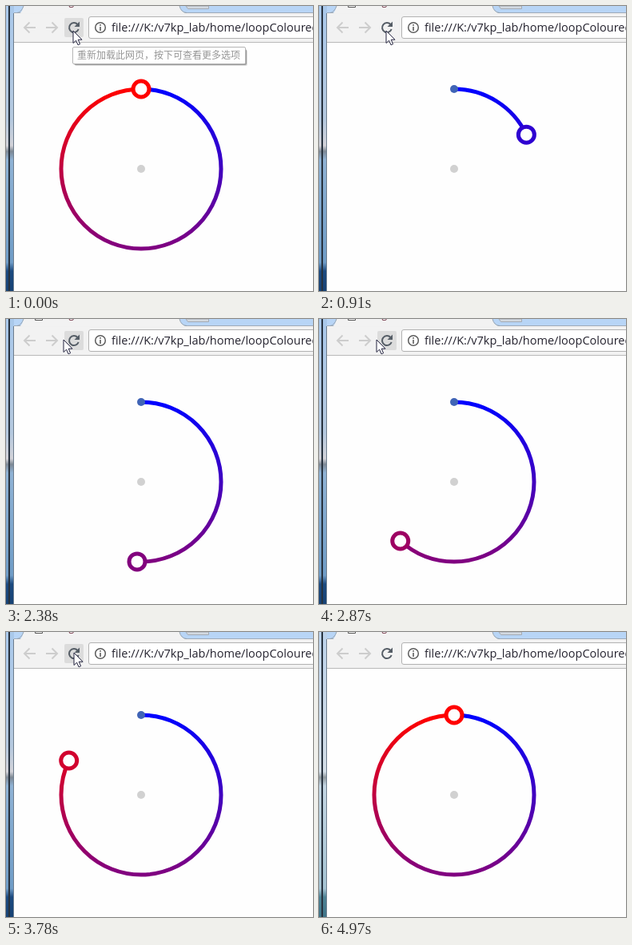
These frames come from a looping animation (384x357 px, 5.04 s). An HTML page:

```html
<!DOCTYPE html>
<html lang="en">
<head>
<meta charset="utf-8">
<title>Gradient ring</title>
<style>
  html, body { margin: 0; width: 100%; height: 100%; overflow: hidden; background: #fefefe; }
  svg { display: block; width: 384px; height: 357px; }
  .url { font: 14.5px "Open Sans", "Noto Sans", sans-serif; fill: #24222e; }
  .tip { font: 12px "Noto Sans CJK SC", "Noto Sans CJK", sans-serif; fill: #969696; }
  .tab { font: 12px "Open Sans", sans-serif; fill: #6b2a3c; }
  .line { fill: none; stroke-width: 2; }
  .arc { fill: none; stroke-width: 5; }
</style>
</head>
<body>
<svg viewBox="0 0 384 357">
  <defs>
    <linearGradient id="right" gradientUnits="userSpaceOnUse" x1="0" y1="104" x2="0" y2="304">
      <stop stop-color="#00f"/><stop offset="1" stop-color="#800080"/>
    </linearGradient>
    <linearGradient id="left" gradientUnits="userSpaceOnUse" x1="0" y1="104" x2="0" y2="304">
      <stop stop-color="#f00"/><stop offset="1" stop-color="#800080"/>
    </linearGradient>
    <linearGradient id="desk" x2="0" y2="1">
      <stop stop-color="#a9c8ea"/><stop offset=".4" stop-color="#b4c8de"/>
      <stop offset=".49" stop-color="#d2d2d8"/><stop offset=".51" stop-color="#7d8894"/>
      <stop offset=".54" stop-color="#8fb2d4"/><stop offset=".9" stop-color="#6f9cc6"/>
      <stop offset=".93" stop-color="#1c4a80"/><stop offset="1" stop-color="#174274"/>
    </linearGradient>
    <linearGradient id="deskLate" x2="0" y2="1">
      <stop stop-color="#bcd2ea"/><stop offset=".49" stop-color="#d3dde6"/>
      <stop offset=".51" stop-color="#8e979c"/><stop offset=".54" stop-color="#c3d5e2"/>
      <stop offset=".9" stop-color="#a5c3d2"/><stop offset=".93" stop-color="#4d8294"/>
      <stop offset="1" stop-color="#3f7488"/>
    </linearGradient>
  </defs>

  <!-- window edge -->
  <rect id="edge" width="10" height="357"/>
  <rect x="3" width="2" height="357" fill="#27323e"/>
  <rect x="9" y="9" width="1" height="348" fill="#6d7d8d"/>

  <!-- tab strip and toolbar -->
  <rect x="10" width="374" height="9" fill="#b8d5f6"/>
  <rect x="10" y="9" width="374" height="36" fill="#f2f2f2"/>
  <path d="M10 8.5H384" stroke="#9fabb8"/>
  <path d="M10 9.5H17Q20 8 22 0H217Q219 8 226 9.5Z" fill="#f2f2f2"/>
  <path d="M14 8.5Q19 8 22 0M217 0Q219 8 226 8.5" fill="none" stroke="#96a3b0"/>
  <path d="M225 0L227.5 3.5H253.500V0Z" fill="#d3d9e0" stroke="#a3aab3"/>
  <path id="page" d="M36.500 -4V1.500H45.500V-4" fill="#fff" stroke="#555"/>
  <text class="tab" x="51" y="-1">arcing</text>
  <path d="M10 45.500H384" stroke="#b9b9b9"/>

  <g class="line" stroke="#cdcdcd">
    <path d="M37 27H23.500M29.500 20.500L23 27L29.500 33.500"/>
    <path d="M50 27H63.500M57.500 20.500L64 27L57.500 33.500"/>
  </g>
  <rect id="hover" x="73" y="15" width="24" height="24" rx="2" fill="#dcdcdc"/>
  <path class="line" d="M89.500 23A6 6 0 1 0 90.700 29" stroke="#555d66"/>
  <path d="M92 19.500V26H85.500Z" fill="#555d66"/>

  <rect x="103.500" y="13.500" width="300" height="27" rx="2.500" fill="#fff" stroke="#b2b2b2"/>
  <circle cx="118" cy="27" r="6.300" fill="none" stroke="#5c5c5c" stroke-width="1.500"/>
  <path d="M118 23V24.700M118 26V31" stroke="#5c5c5c" stroke-width="1.600"/>
  <text class="url" x="132" y="32">file:///K:/v7kp_lab/home/loopColoured</text>

  <!-- ring -->
  <circle cx="169" cy="204" r="5" fill="#d1d1d1"/>
  <path id="arcR" class="arc" d="M169 104A100 100 0 0 1 169 304" pathLength="180" stroke="url(#right)"/>
  <path id="arcL" class="arc" d="M169 304A100 100 0 0 1 169 104" pathLength="180" stroke="url(#left)"/>
  <circle cx="169" cy="104" r="5" fill="#4064b6"/>
  <circle id="knob" r="10" fill="#fefefe" stroke-width="5"/>

  <g id="tip">
    <rect x="86" y="55" width="216" height="20" rx="2" fill="#000" opacity=".12"/>
    <rect x="85" y="54" width="216" height="20" rx="2" fill="#000" opacity=".3"/>
    <rect x="83.500" y="51.500" width="216" height="21" rx="1.500" fill="#fff" stroke="#b5b5b5"/>
    <text class="tip" x="89" y="66">重新加载此网页，按下可查看更多选项</text>
  </g>
  <path id="cursor" d="M0 0V15.500L3.600 12.200L6 17.800L8.600 16.700L6.200 11.200H11Z" fill="#fff" stroke="#23233f"/>
</svg>
<script>
  const STEP = 70, STEPS = 72;
  const START = 1.52, DEG_PER_STEP = 5.63;
  const $ = id => document.getElementById(id);
  const show = (id, on) => $(id).setAttribute('visibility', on ? 'visible' : 'hidden');

  // pointer stops: step, x, y
  const stops = [[0, 84, 31], [28, 84, 31], [30, 72, 26], [51, 72, 26],
                 [53, 85, 26], [58, 85, 26], [63, 354, 357]];

  function pointer(n) {
    const i = stops.findIndex(s => s[0] > n);
    if (i < 0) return stops[stops.length - 1].slice(1);
    const [t0, x0, y0] = stops[i - 1], [t1, x1, y1] = stops[i];
    const k = (n - t0) / (t1 - t0);
    return [x0 + (x1 - x0) * k, y0 + (y1 - y0) * k];
  }

  function drawRing(deg) {
    const a = deg * Math.PI / 180, red = Math.round(255 * deg / 360);
    $('arcR').setAttribute('stroke-dasharray', `${Math.min(deg, 180)} 400`);
    $('arcL').setAttribute('stroke-dasharray', `${Math.max(deg - 180, 0)} 400`);
    show('arcR', deg > 0);
    show('arcL', deg > 180);
    $('knob').setAttribute('cx', 169 + 100 * Math.sin(a));
    $('knob').setAttribute('cy', 204 - 100 * Math.cos(a));
    $('knob').setAttribute('stroke', `rgb(${red},0,${255 - red})`);
  }

  function draw(n) {
    const turn = (n - START) * DEG_PER_STEP;
    drawRing(n === 0 ? 360 : Math.max(0, Math.min(360, turn)));
    show('tip', n === 0);
    show('page', n > 0);
    show('hover', n === 0 || (n >= 19 && n < 59));
    show('cursor', n < 63);
    $('cursor').setAttribute('transform', `translate(${pointer(n)})`);
    $('edge').setAttribute('fill', n < 70 ? 'url(#desk)' : 'url(#deskLate)');
  }

  function tick() {
    draw(Math.floor(performance.now() / STEP) % STEPS);
    requestAnimationFrame(tick);
  }
  tick();
</script>
</body>
</html>
```
